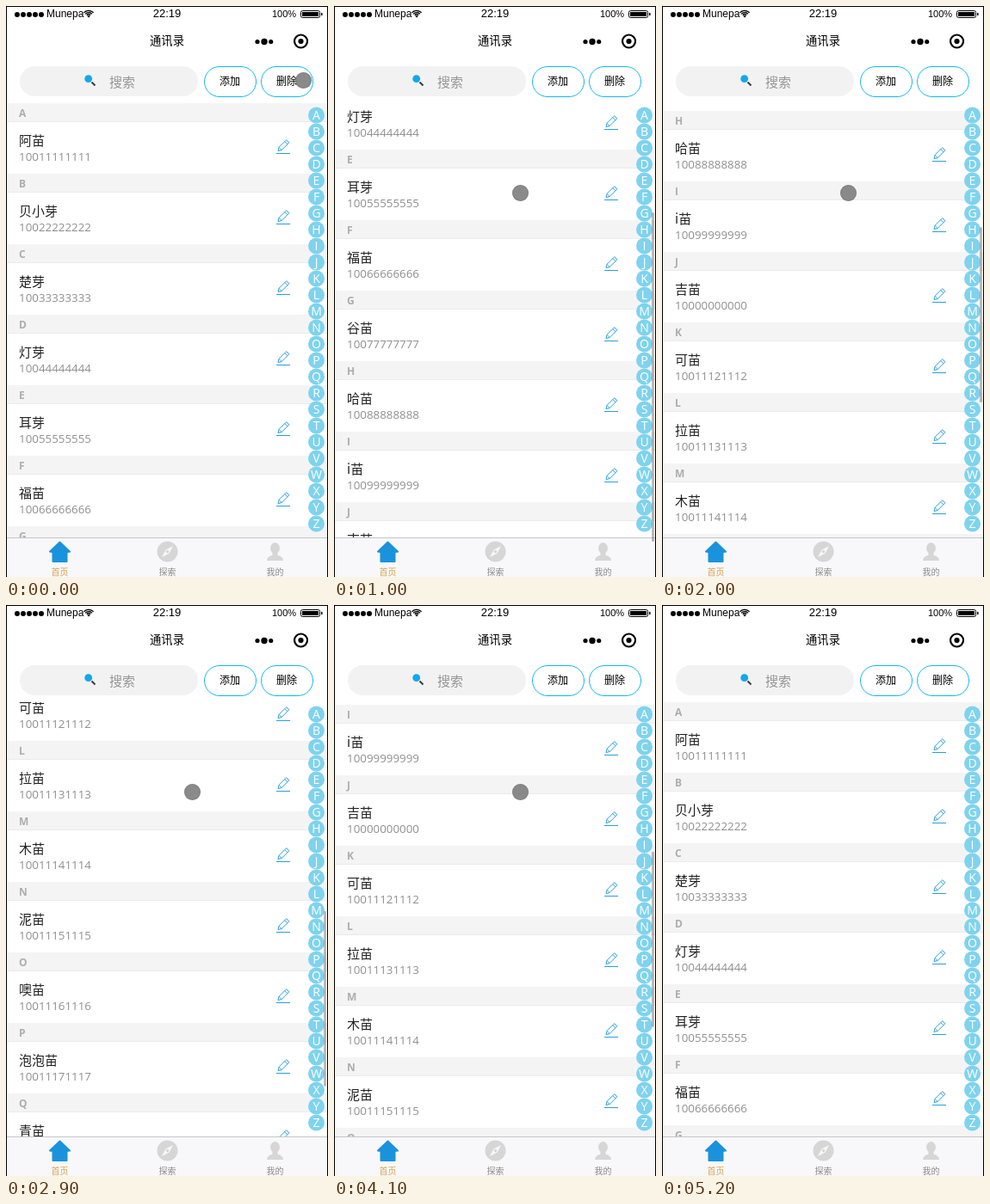
Write an HTML page with a canvas that moves like this. It is 374 by 664 pixels and loops after 5.8 s.

```html
<!DOCTYPE html>
<html lang="zh-CN">
<head>
<meta charset="utf-8">
<title>通讯录</title>
<style>
html, body { margin: 0; width: 100%; height: 100%; overflow: hidden; background: #fff; }
canvas { display: block; width: 374px; height: 664px; }
</style>
</head>
<body>
<canvas id="stage"></canvas>
<script>
const W = 374, H = 664, LOOP = 5800, STEP = 100;
const LIST_TOP = 113, LIST_END = 618, ROW = 82;
const CJK = '"Noto Sans CJK SC", "Noto Sans CJK", sans-serif';
const ARIAL = '"Liberation Sans", sans-serif';
const HUMAN = '"Open Sans", "Noto Sans", sans-serif';

const canvas = document.getElementById('stage');
const c = canvas.getContext('2d');
const dpr = window.devicePixelRatio || 1;
canvas.width = W * dpr;
canvas.height = H * dpr;

const names = ('阿苗 贝小芽 楚芽 灯芽 耳芽 福苗 谷苗 哈苗 i苗 吉苗 ' +
  '可苗 拉苗 木苗 泥苗 噢苗 泡泡苗 青苗 软苗 丝瓜苗 甜苗').split(' ');
const letter = i => String.fromCharCode(65 + i);
const contacts = names.map((name, i) => {
  const k = i - 10;
  const tail = k < 0 ? String((i + 1) % 10).repeat(8) : String(1112 + k + (k > 7)).repeat(2);
  return { name, phone: '100' + tail };
});

// scroll offset over time: [ms, px]
const scrollKeys = [
  [400, 0], [700, 209], [800, 209], [900, 232], [1000, 274], [1200, 340],
  [1400, 340], [1700, 518], [1900, 518], [2000, 565], [2100, 640],
  [2300, 640], [2600, 844], [2800, 844], [2900, 857], [3100, 1124],
  [3300, 1124], [3500, 1145], [3700, 1145], [3800, 1141], [4300, 328],
  [4400, 310], [4500, 246], [4700, 0]
];

function sample(keys, t) {
  if (t <= keys[0][0]) return keys[0][1];
  for (let i = 1; i < keys.length; i++) {
    const [t0, a] = keys[i - 1], [t1, b] = keys[i];
    if (t <= t1) return a + (b - a) * (t - t0) / (t1 - t0);
  }
  return keys[keys.length - 1][1];
}

// y is the middle of the glyphs
function text(s, x, y, size, color, family = CJK, align = 'left', weight = 400) {
  c.font = `${weight} ${size}px ${family}`;
  c.textAlign = align;
  c.fillStyle = color;
  c.fillText(s, x, Math.round(y + size * 0.37));
}

function rect(x, y, w, h, color) {
  c.fillStyle = color;
  c.fillRect(x, y, w, h);
}

function disc(x, y, r, color) {
  c.fillStyle = color;
  c.beginPath();
  c.arc(x, y, r, 0, Math.PI * 2);
  c.fill();
}

function pill(x, y, w, h, r = h / 2) {
  c.beginPath();
  c.roundRect(x, y, w, h, r);
}

function poly(points, close = true) {
  c.beginPath();
  points.forEach(([x, y]) => c.lineTo(x, y));
  if (close) c.closePath();
}

function stroke(color, width) {
  c.strokeStyle = color;
  c.lineWidth = width;
  c.stroke();
}

function fill(color) {
  c.fillStyle = color;
  c.fill();
}

function statusBar() {
  for (let i = 0; i < 5; i++) disc(13 + i * 7, 10, 3, '#000');
  text('Munepa', 47, 9, 12, '#000', ARIAL);
  for (const r of [2.8, 5, 7.2]) {
    c.beginPath();
    c.arc(96, 12.5, r, -Math.PI * 0.78, -Math.PI * 0.22);
    stroke('#000', 1.3);
  }
  disc(96, 12, 1.3, '#000');
  text('22:19', 187, 8.5, 13, '#000', ARIAL, 'center');
  text('100%', 309, 9, 11, '#000', ARIAL);
  pill(342.5, 5.5, 22, 8, 2);
  stroke('#000', 1);
  rect(344, 7, 19, 5, '#000');
  rect(366, 8, 1.5, 3, '#000');
}

function navBar() {
  text('通讯录', 187, 40, 13.3, '#000', CJK, 'center');
  disc(292, 41.5, 2.6, '#000');
  disc(300, 41.5, 3.7, '#000');
  disc(307.7, 41.5, 2.6, '#000');
  c.beginPath();
  c.arc(342.5, 41, 7.5, 0, Math.PI * 2);
  stroke('#000', 2.2);
  disc(342.5, 41, 3.1, '#000');
}

function button(x, label) {
  pill(x + 0.5, 70.5, 60, 35);
  stroke('#12b7f0', 1);
  text(label, x + 30, 88, 12, '#000', CJK, 'center');
}

function searchBar() {
  pill(16, 70, 207, 35);
  fill('#f2f2f2');
  poly([[99.5, 88.5], [103.5, 92.5]], false);
  stroke('#3a3a3a', 1.9);
  disc(95.7, 84.7, 4.4, '#12a7ee');
  text('搜索', 120, 88, 15, '#969696');
  button(230, '添加');
  button(296, '删除');
}

function pencil(x, y) {
  c.save();
  c.translate(x, y);
  poly([[2, 13.5], [3, 9.3], [11.7, 0.7], [14.8, 3.8], [6.2, 12.5]]);
  stroke('#2a9fd8', 1);
  poly([[9.8, 2.6], [12.9, 5.7]], false);
  stroke('#2a9fd8', 1);
  poly([[3, 9.3], [6.2, 12.5]], false);
  stroke('#2a9fd8', 0.8);
  rect(0, 16, 16, 1, '#2a9fd8');
  c.restore();
}

function list(offset, count) {
  c.save();
  c.beginPath();
  c.rect(1, LIST_TOP, W - 2, LIST_END - LIST_TOP);
  c.clip();
  for (let i = 0; i < count; i++) {
    const y = LIST_TOP + i * ROW - Math.round(offset);
    if (y + ROW < LIST_TOP || y > LIST_END) continue;
    rect(1, y, W - 2, 21, '#f4f4f5');
    rect(1, y + 21, W - 2, 1, '#ebebeb');
    text(letter(i), 15, y + 12, 12, '#adadad', HUMAN, 'left', 700);
    text(contacts[i].name, 15, y + 43, 15, '#222');
    text(contacts[i].phone, 15, y + 62, 13.35, '#8f8f8f', HUMAN);
    pencil(314, y + 42);
  }
  c.restore();
}

function indexBar() {
  for (let i = 0; i < 26; i++) {
    const y = 127 + i * 19;
    disc(360.5, y, 9.5, '#7fd3ee');
    text(letter(i), 360.5, y, 14, '#fff', HUMAN, 'center', 500);
  }
}

function tabBar() {
  rect(1, LIST_END, W - 2, H - LIST_END, '#f8f8fa');
  rect(1, LIST_END, W - 2, 1, '#c6c6c8');

  poly([[62.5, 623.5], [74, 634.5], [70.5, 635], [70.5, 646], [54.5, 646], [54.5, 635], [51, 634.5]]);
  fill('#1a93dc');
  c.lineJoin = 'round';
  stroke('#1a93dc', 2);
  c.lineJoin = 'miter';
  text('首页', 62.5, 658, 10, '#d9a14e', CJK, 'center');

  disc(187.5, 634.5, 12, '#d6d6d6');
  poly([[194, 628], [189.5, 636.5], [181, 641], [185.5, 632.5]]);
  fill('#f8f8fa');
  disc(187.5, 634.5, 1.7, '#d6d6d6');
  text('探索', 187.5, 658, 10, '#8a8a8a', CJK, 'center');

  c.beginPath();
  c.ellipse(312.5, 630.5, 5.5, 6.5, 0, 0, Math.PI * 2);
  fill('#d6d6d6');
  rect(309.5, 634, 6, 6, '#d6d6d6');
  c.beginPath();
  c.moveTo(303, 645);
  c.quadraticCurveTo(303, 640, 310, 638.5);
  c.lineTo(315, 638.5);
  c.quadraticCurveTo(322, 640, 322, 645);
  fill('#d6d6d6');
  text('我的', 312.5, 658, 10, '#8a8a8a', CJK, 'center');
}

function scrollBar(t, offset, loaded) {
  if (t < 500 || t >= 5200) return;
  const [ratio, length] = loaded ? [0.338, 204] : [0.635, 383];
  c.globalAlpha = t < 4900 ? 1 : (5200 - t) / 400;
  pill(369, 66 + offset * ratio, 3, length);
  fill('rgba(120,120,120,.5)');
  c.globalAlpha = 1;
}

function pointer(t) {
  if (t >= 5000) return;
  const k = Math.min(t / 200, 1);
  const x = 345.5 - 129 * k, y = 86.5 + 131 * k;
  disc(x, y, 9.5, 'rgba(116,116,116,.84)');
  c.beginPath();
  c.arc(x, y, 9, 0, Math.PI * 2);
  stroke('rgba(100,100,100,.3)', 1);
}

function draw(now) {
  const t = Math.min(Math.floor((now % LOOP) / STEP) * STEP, 5200);
  const offset = sample(scrollKeys, t);
  const loaded = t >= 1100;
  c.setTransform(dpr, 0, 0, dpr, 0, 0);
  rect(0, 0, W, H, '#fff');
  list(offset, loaded ? 20 : 10);
  statusBar();
  navBar();
  searchBar();
  indexBar();
  tabBar();
  scrollBar(t, offset, loaded);
  pointer(t);
  rect(0, 0, W, 1, '#000');
  rect(0, 0, 1, H, '#000');
  rect(W - 1, 0, 1, H, '#000');
}

const start = performance.now();
function tick() {
  draw(performance.now() - start);
  requestAnimationFrame(tick);
}
tick();
</script>
</body>
</html>
```
